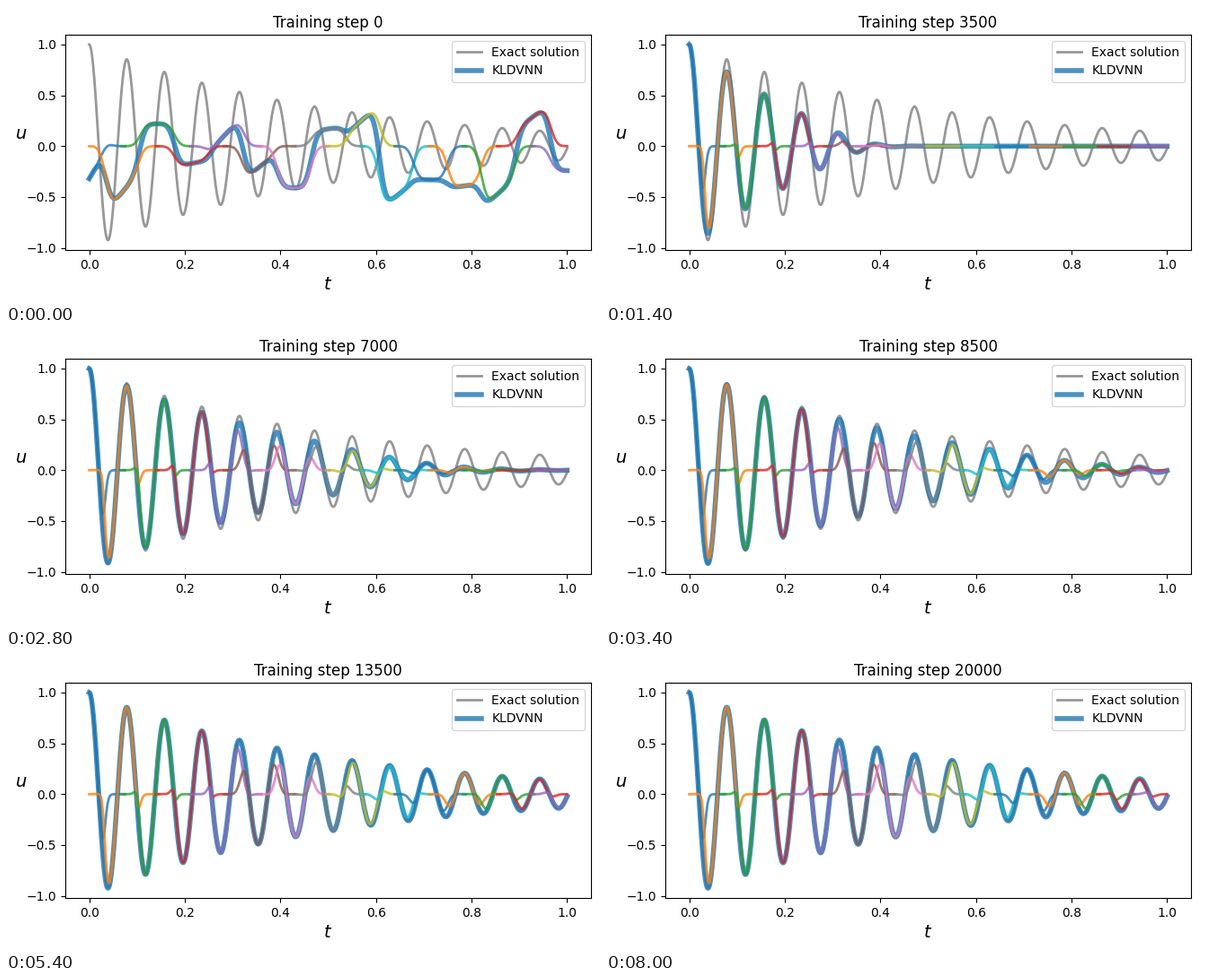
A matplotlib script for the animation above (8.2 s loop, 661x330 px).

```python
import numpy as np
import matplotlib.pyplot as plt
from matplotlib.animation import FuncAnimation

W, H, DPI = 661, 330, 100
FRAMES, INTERVAL, STEP = 41, 200, 500
N, HALF = 15, 0.075

t = np.linspace(0, 1, 1401)
centers = np.linspace(0, 1, N)
mids = (centers[1:] + centers[:-1]) / 2

# Underdamped oscillator
d, w0 = 2, 80
w = np.sqrt(w0**2 - d**2)
phi = np.arctan(-d / w)
exact = np.exp(-d * t) * np.cos(phi + w * t) / np.cos(phi)


def bump(dist, power):
    return np.cos(np.pi / 2 * np.clip(dist / HALF, 0, 1)) ** (4 * power)


def partition(shift, power):
    """Smooth windows, one per subdomain, that sum to one."""
    rise = [np.ones_like(t)]
    for a, b, s, p in zip(centers, centers[1:], shift, power):
        left, right = bump(t - s - a, p), bump(b - t + s, p)
        rise.append(right / (left + right))
    rise.append(np.zeros_like(t))
    return -np.diff(rise, axis=0)


# Untrained networks are straight lines through these heights
heights = np.array([-.32, -.44, .22, -.17, .12, -.2, -.41, .17,
                    .26, -.49, -.33, -.39, -.46, .29, -.24])
slopes = 5 * np.cos(np.pi / 4 * np.arange(N) - .3) ** 2 - .4
slopes *= 1 + np.exp(-6 * centers)
raw = heights[:, None] + slopes[:, None] * (t - centers[:, None])
start = raw * partition(0 * mids, 0 * mids + 1)

# Trained networks hand over more sharply near the left end
early = 1 / (1 + np.exp((mids - .29) / .012))
split = partition(-.005 * np.cos(14 * (mids - .08)) * early, 1 + early)


def learned(step):
    """Share of the amplitude found so far, a front moving right."""
    k = step / 1000
    front = .093 * k + (k / 11.5) ** 16
    width = .0085 * k ** 1.25
    damping = 10.5 * np.exp(-k / 2)
    return np.clip(1 - damping * t, 0, 1) / (1 + np.exp((t - front) / width))


def solve(step):
    if step == 0:
        return start
    return start * np.exp(-step / 300) + split * exact * learned(step)


fig = plt.figure(figsize=(W / DPI, H / DPI), dpi=DPI)
ax = fig.add_axes([66 / W, 1 - 272 / H, 585 / W, 240 / H])
ax.plot(t, exact, lw=2, color="tab:grey", alpha=.8, label="Exact solution")
total, = ax.plot(t, exact, lw=4, color="tab:blue", alpha=.8, label="KLDVNN")
masks = [np.abs(t - c) <= HALF for c in centers]
lines = [ax.plot(t[m], exact[m], lw=2, color=f"C{i % 10}", alpha=.8)[0]
         for i, m in enumerate(masks)]
margin = .05 * np.ptp(exact)
ax.set_xlim(-.05, 1.05)
ax.set_ylim(exact.min() - margin, exact.max() + margin)
ax.set_xlabel("$t$", fontsize=14)
ax.set_ylabel("$u$", fontsize=14, rotation=0)
ax.legend(loc="upper right")
title = ax.set_title("Training step 0")


def update(i):
    step = i * STEP
    parts = solve(step)
    total.set_ydata(parts.sum(axis=0))
    for line, part, m in zip(lines, parts, masks):
        line.set_ydata(part[m])
    title.set_text(f"Training step {step}")
    return [total, title, *lines]


anim = FuncAnimation(fig, update, frames=FRAMES, interval=INTERVAL,
                     repeat=True, repeat_delay=0, blit=False)
plt.show()
```
